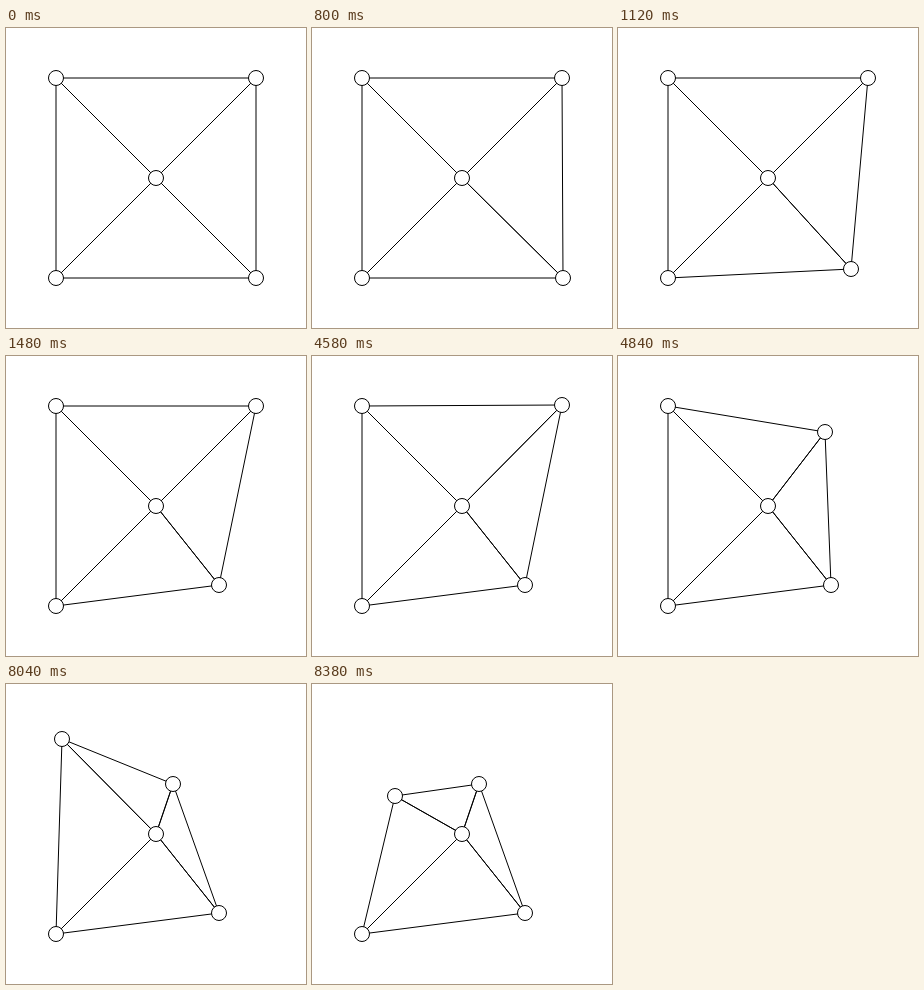
Animation, 300 px wide and 300 px high, one loop 8.4 s. Source, as an HTML page with a canvas:

```html
<!DOCTYPE html>
<html>
<head>
<meta charset="utf-8">
<style>
html, body { margin: 0; width: 100%; height: 100%; overflow: hidden; background: #fff; }
canvas { display: block; width: 300px; height: 300px; }
</style>
</head>
<body>
<canvas id="stage" width="300" height="300"></canvas>
<script>
const ctx = document.getElementById('stage').getContext('2d');
const LOOP = 8400;
const TICK = 20;
const RADIUS = 7.5;

const home = [[50, 50], [250, 50], [250, 250], [50, 250], [150, 150]];
const rim = [[0, 1], [1, 2], [2, 3], [3, 0]];
// Spokes are stroked once from each end, which makes them darker.
const spokes = [0, 1, 2, 3].flatMap(i => [[4, i], [i, 4]]);
const edges = [...rim, ...spokes];

// Each drag moves one node in discrete steps along [time, x, y] points.
const drags = [
  { node: 2, steps: 12, path: [[740, 251, 250], [960, 239, 245], [1480, 213, 229]] },
  { node: 1, steps: 11, path: [[4580, 250, 49], [5080, 167, 100]] },
  { node: 0, steps: 8, path: [[8040, 56, 55], [8380, 83, 112]] }
];

function steppedTime(t, start, end, steps) {
  const gap = (end - start) / (steps - 1);
  let shown = start;
  for (let k = 1; k < steps; k++) {
    const at = start + Math.ceil(k * gap / TICK - 1e-6) * TICK;
    if (at <= t) shown = at;
  }
  return shown;
}

function pointAt(path, t) {
  let i = 1;
  while (i < path.length - 1 && t > path[i][0]) i++;
  const [t0, x0, y0] = path[i - 1];
  const [t1, x1, y1] = path[i];
  const u = (t - t0) / (t1 - t0);
  return [Math.round(x0 + (x1 - x0) * u), Math.round(y0 + (y1 - y0) * u)];
}

function nodesAt(t) {
  const nodes = home.slice();
  for (const { node, steps, path } of drags) {
    const start = path[0][0];
    const end = path[path.length - 1][0];
    if (t >= start) nodes[node] = pointAt(path, steppedTime(t, start, end, steps));
  }
  return nodes;
}

function draw(t) {
  const nodes = nodesAt(t);
  ctx.fillStyle = '#fff';
  ctx.fillRect(0, 0, 300, 300);
  ctx.strokeStyle = '#000';
  ctx.lineWidth = 1;
  for (const [a, b] of edges) {
    ctx.beginPath();
    ctx.moveTo(...nodes[a]);
    ctx.lineTo(...nodes[b]);
    ctx.stroke();
  }
  ctx.fillStyle = '#fff';
  for (const [x, y] of nodes) {
    ctx.beginPath();
    ctx.arc(x, y, RADIUS, 0, Math.PI * 2);
    ctx.fill();
    ctx.stroke();
  }
}

const began = performance.now();
function frame() {
  draw((performance.now() - began) % LOOP);
  requestAnimationFrame(frame);
}
frame();
</script>
</body>
</html>
```
